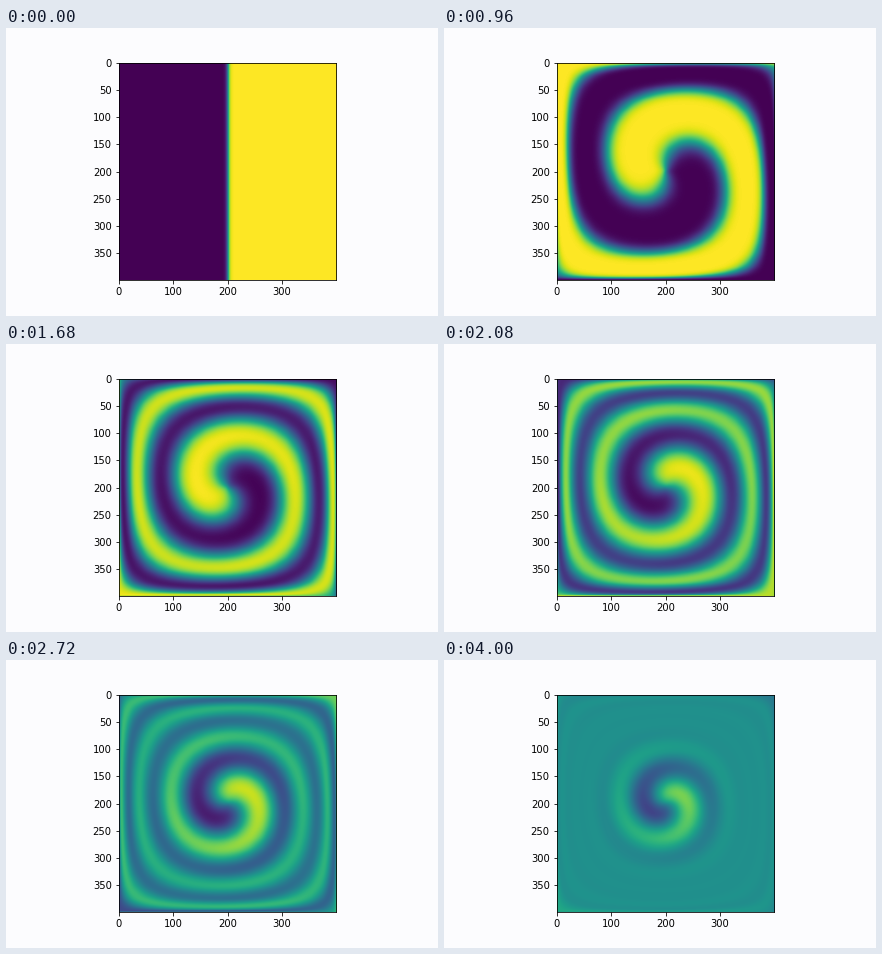
Animation of 432x288 px, one loop 4.04 s. Source, as a matplotlib script:

```python
import numpy as np
import matplotlib.pyplot as plt
from matplotlib.animation import FuncAnimation

FRAMES, INTERVAL = 101, 40
SIZE = 400            # domain width in axis units
N = 200               # cells per side
TURN = 16             # frames per turn at the vortex centre
SPEED = 2 / TURN      # peak speed in domain widths per frame
MIXING = 0.5          # diffusion per unit of local speed, in axis units
SUBSTEPS, SMOOTHINGS = 4, 8


def velocity(x, y):
    """Counter-clockwise cell flow in the unit square, y pointing down."""
    return (-SPEED * np.sin(np.pi * x) * np.cos(np.pi * y),
            SPEED * np.cos(np.pi * x) * np.sin(np.pi * y))


def departure(x, y, time, steps=8):
    """Trace points back along the flow with the midpoint rule."""
    h = time / steps
    for _ in range(steps):
        u, v = velocity(x, y)
        u, v = velocity(x - u * h / 2, y - v * h / 2)
        x, y = x - u * h, y - v * h
    return x, y


def cubic(pos):
    """Base index and four Catmull-Rom weights on a grid padded by two."""
    p = np.clip(pos * N - 0.5, -0.5, N - 0.5)
    i = np.floor(p).astype(int)
    t = p - i
    w = ((-t + 2 * t**2 - t**3) / 2, (2 - 5 * t**2 + 3 * t**3) / 2,
         (t + 4 * t**2 - 3 * t**3) / 2, (t**3 - t**2) / 2)
    return i + 1, w


def face_mixing(time):
    """Exchange between neighbours, growing with the speed across each face."""
    centre, face = (np.arange(N) + 0.5) / N, np.arange(1, N) / N
    u, _ = velocity(*np.meshgrid(face, centre))
    _, v = velocity(*np.meshgrid(centre, face))
    scale = MIXING * SIZE * time / (SIZE / N) ** 2
    return scale * np.abs(u), scale * np.abs(v)


def smooth(field, kx, ky):
    fx = kx * np.diff(field, axis=1)
    fy = ky * np.diff(field, axis=0)
    field[:, :-1] += fx
    field[:, 1:] -= fx
    field[:-1] += fy
    field[1:] -= fy


def simulate():
    c = (np.arange(N) + 0.5) / N
    x, y = np.meshgrid(c, c)
    dx, dy = departure(x, y, 1 / SUBSTEPS)
    (ix, wx), (iy, wy) = cubic(dx), cubic(dy)
    kx, ky = face_mixing(1 / SUBSTEPS / SMOOTHINGS)
    width = N + 4
    taps = [((iy + b) * width + ix + a, wy[b] * wx[a])
            for b in range(4) for a in range(4)]

    field = 0.5 + 0.5 * np.tanh((x - 0.5) * SIZE / 4)
    fields = [field]
    for _ in range(FRAMES - 1):
        for _ in range(SUBSTEPS):
            flat = np.pad(field, 2, mode="symmetric").ravel()
            field = np.clip(sum(w * flat[i] for i, w in taps), 0, 1)
            for _ in range(SMOOTHINGS):
                smooth(field, kx, ky)
        fields.append(field)
    return fields


fields = simulate()

plt.rcParams["font.family"] = "DejaVu Sans"
plt.rcParams["font.size"] = 10
fig, ax = plt.subplots(figsize=(6, 4), dpi=72, facecolor="#fcfcfe")
fig.subplots_adjust(left=0.125, right=0.9, bottom=0.125, top=0.88)
image = ax.imshow(fields[0], cmap="viridis", vmin=0, vmax=1,
                  extent=(-0.5, SIZE - 0.5, SIZE - 0.5, -0.5))
ax.set_xticks(range(0, SIZE, 100))
ax.set_yticks(range(0, SIZE, 50))


def update(i):
    image.set_data(fields[i])
    return [image]


anim = FuncAnimation(fig, update, frames=FRAMES, interval=INTERVAL,
                     repeat=True, repeat_delay=0)
plt.show()
```
